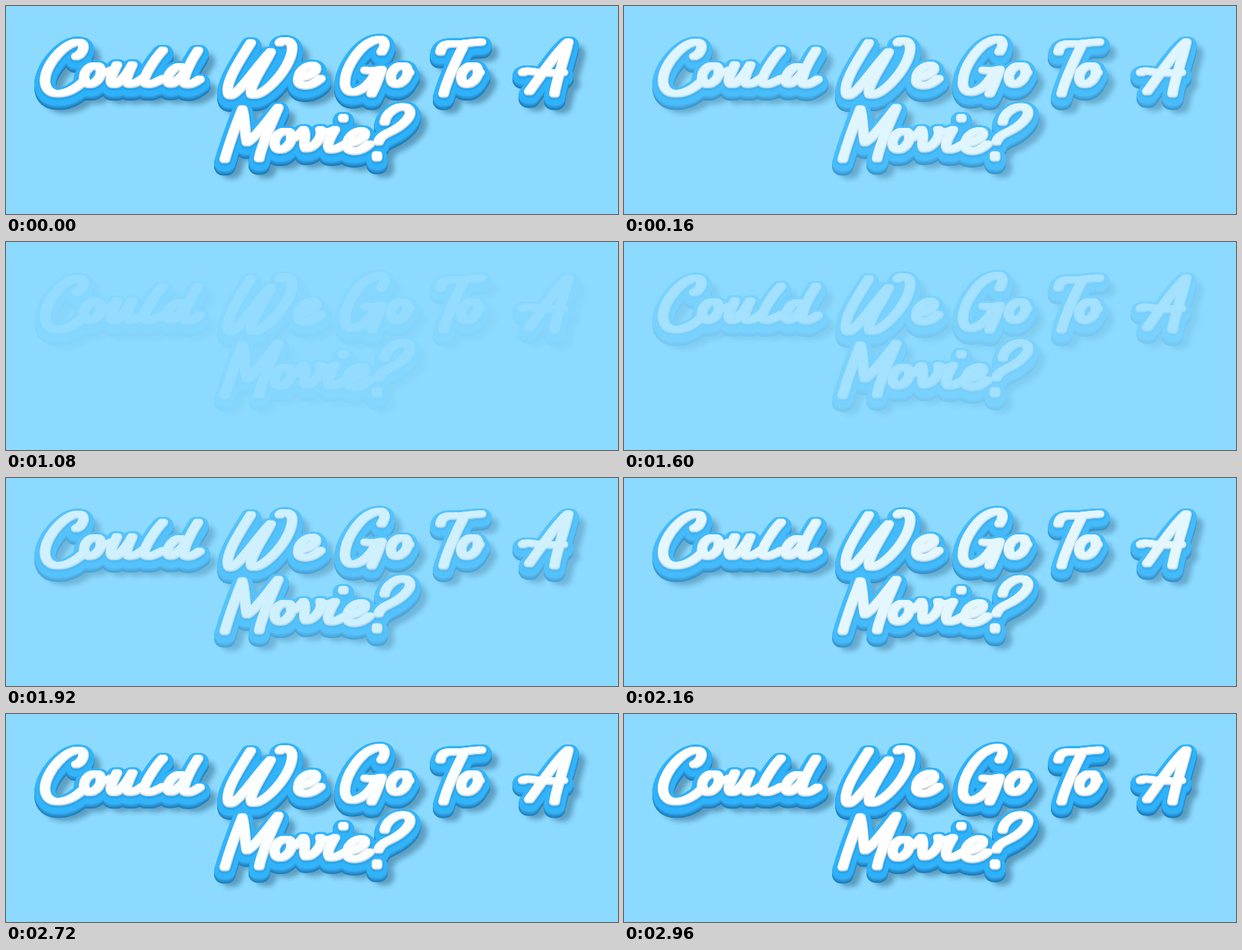
Recreate the animation shown at these times as an HTML page. Size 800 by 273 pixels, loop 3000 ms.

```html
<!DOCTYPE html>
<html lang="en">
<head>
<meta charset="utf-8">
<title>Could We Go To A Movie?</title>
<style>
  html, body { margin: 0; width: 100%; height: 100%; overflow: hidden; background: #8cdaff; }
  svg { display: block; width: 100vw; height: 100vh; }
  path { fill: none; stroke-linecap: round; stroke-linejoin: round; }
</style>
</head>
<body>
<svg viewBox="0 0 800 273" role="img" aria-label="Could We Go To A Movie?">
  <defs>
    <filter id="soft" x="-5%" y="-10%" width="110%" height="120%"><feGaussianBlur stdDeviation="3"/></filter>
  </defs>
  <g id="title"></g>
</svg>
<script>
const NS = 'http://www.w3.org/2000/svg';
const title = document.getElementById('title');

// Pen paths of the script letters: [path, x shift, y shift]
const o = 'M118 79C108 76 98 90 104 100C111 108 126 95 124 84C123 79 121 78 118 79';
const e = 'M385 94C396 93 407 86 405 80C401 73 382 82 382 97C382 107 398 107 411 95';
const letters = [
  // Could
  ['M92 66C100 63 105 51 98 48C83 42 51 74 51 98C52 121 80 120 103 97'],
  [o], ['M124 87Q130 89 138 84'],
  ['M145 77C140 88 134 98 139 102C146 106 158 90 165 77C160 88 155 98 160 102C165 104 172 100 180 94'],
  ['M205 58C197 66 179 92 181 100C185 106 196 100 206 95'],
  ['M232 81C222 74 208 92 212 100C217 107 229 94 237 83M251 58C243 70 229 96 234 102C239 105 246 101 253 96'],
  // We
  ['M320 48C305 72 285 102 291 116C298 125 325 82 346 60C335 82 316 107 321 116C336 122 377 77 374 52C372 44 361 44 358 48'],
  [e],
  // Go
  ['M491 60C499 48 493 42 485 44C464 48 443 80 443 101C444 121 468 115 483 89'],
  ['M470 84Q480 86 491 83C486 98 482 108 478 115'],
  [o, 401], ['M525 87h2'],
  // To
  ['M568 60C570 46 584 50 599 49C609 48 615 47 621 47M598 52C589 70 577 95 572 115'],
  [o, 493], ['M617 87h2'],
  // A
  ['M735 47C719 60 697 95 684 112M735 47C730 70 720 95 717 115M676 87C683 81 692 91 728 87'],
  // Movie?
  ['M309 135C301 155 292 180 286 201M309 135C313 148 312 168 315 179C325 174 342 150 356 133C347 155 334 182 331 200'],
  [o, 249, 86], ['M373 173Q380 174 388 163'],
  ['M389 162C394 168 387 182 392 187C402 187 415 172 411 162Q417 168 428 163'],
  ['M430 162C424 172 418 182 423 188C430 190 438 184 447 179M441 146v2'],
  [e, 64, 86],
  ['M495 152C497 140 512 129 524 133C537 141 518 158 500 166C491 170 488 174 487 178M485 195v4']
];

// A broad nib: the same line laid down at three horizontal offsets
const nib = [-2.4, 0, 2.4];

function layer(color, width, dx, dy) {
  const g = document.createElementNS(NS, 'g');
  g.setAttribute('transform', `translate(${dx} ${dy})`);
  g.setAttribute('stroke', color);
  g.setAttribute('stroke-width', width);
  for (const [d, x = 0, y = 0] of letters) {
    for (const n of nib) {
      const p = document.createElementNS(NS, 'path');
      p.setAttribute('d', d);
      p.setAttribute('transform', `translate(${x + n} ${y})`);
      g.append(p);
    }
  }
  title.append(g);
  return g;
}

const shadow = layer('#285878', 22, 9, 15);
shadow.setAttribute('filter', 'url(#soft)');
shadow.setAttribute('opacity', 0.48);

// Extruded side, darkest at the bottom
for (let y = 10; y >= 5; y--) layer(`hsl(203 74% ${72 - 3.2 * y}%)`, 23, 0, y);
layer('#2eb2fb', 22.6, 0, 4.2);
layer('#27a4ec', 12, 0.5, 2.5);

// Face with a bevelled lower edge
layer('#ced4d8', 9.6, 0, 0.6);
layer('#edf0f2', 8.4, 0, 0);
layer('#ffffff', 7.2, -0.3, -0.7);

// [time in ms, opacity]
const fade = [
  [0, 1], [560, 0.05], [600, 0.015], [720, 0], [1079, 0], [1080, 0.07], [1599, 0.07],
  [1600, 0.2], [1800, 0.46], [2000, 0.67], [2160, 0.77], [2440, 0.88], [2680, 0.95], [2960, 1], [3000, 1]
];

function opacityAt(t) {
  const i = fade.findIndex(([time]) => time > t);
  const [t0, a] = fade[i - 1], [t1, b] = fade[i];
  return a + (b - a) * (t - t0) / (t1 - t0);
}

const start = performance.now();
function tick() {
  const t = Math.max(0, performance.now() - start) % 3000;
  title.setAttribute('opacity', opacityAt(Math.floor(t / 40) * 40));
  requestAnimationFrame(tick);
}
tick();
</script>
</body>
</html>
```
